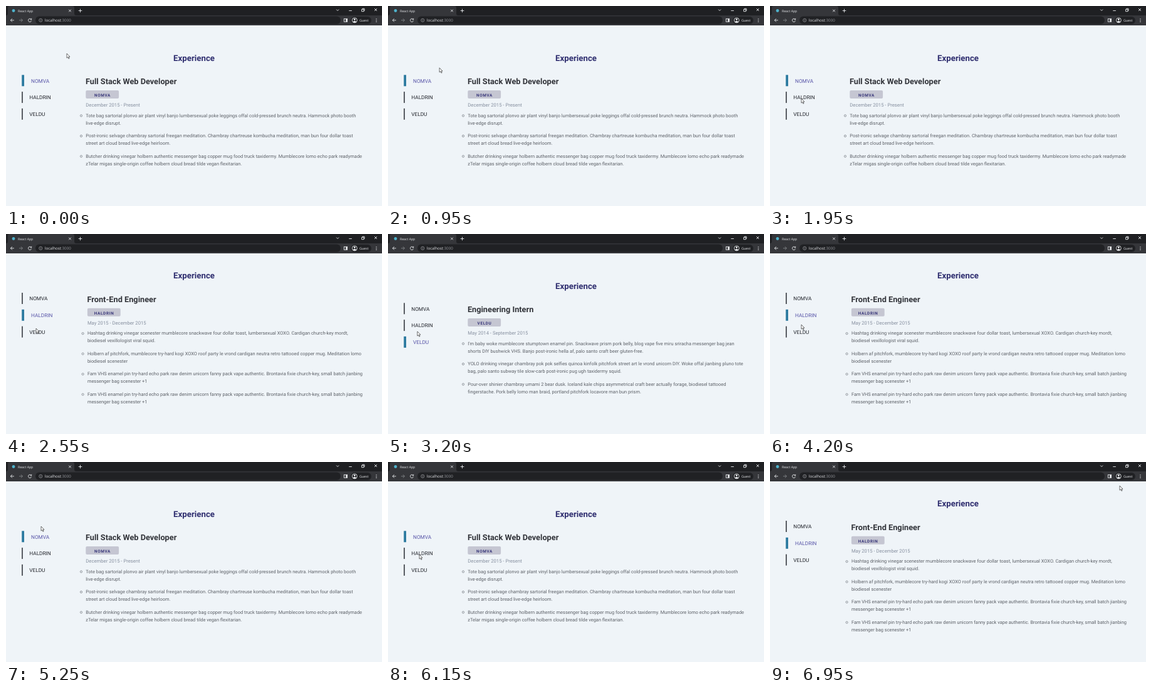
Write an HTML page that moves like this. It is 600 px wide and 320 px high and loops after 7000 ms.

```html
<!DOCTYPE html>
<html lang="en">
<head>
<meta charset="utf-8">
<title>Experience tabs</title>
<style>
html, body { margin: 0; width: 100%; height: 100%; overflow: hidden; background: #eff4f8; }
svg { display: block; width: 600px; height: 320px; }
text { font-family: Roboto, "Open Sans", sans-serif; text-rendering: geometricPrecision; white-space: pre; }
.ui { font-family: "Open Sans", "Noto Sans", sans-serif; fill: #e8eaed; }
.title { font-size: 13.3px; font-weight: 700; fill: #302f70; text-anchor: middle; }
.role { font-size: 12.75px; font-weight: 700; fill: #32343a; }
.tag { font-size: 6.4px; font-weight: 700; fill: #38377a; letter-spacing: .65px; text-anchor: middle; }
.date { font-size: 7.7px; fill: #8790a0; }
.item { font-size: 7.45px; fill: #5d6168; }
.tab { font-size: 8.25px; fill: #22252c; }
.tab.on { fill: #5855a8; }
.line { fill: none; stroke: #e8eaed; stroke-width: .9; }
</style>
</head>
<body>
<svg viewBox="0 0 600 320">
  <rect width="600" height="320" fill="#eff4f8"/>
  <rect width="600" height="31" fill="#35363a"/>
  <path d="M0 0H600V15H112Q109 15 109 12V3Q109 0 106 0H6Q3 0 3 3V12Q3 15 0 15Z" fill="#1f2023"/>
  <circle cx="12" cy="7.5" r="2.4" fill="#4fb3cc"/>
  <text class="ui" x="19" y="9.5" font-size="5.2">React App</text>
  <path class="line" d="M100.2 5.7l3.6 3.6m0-3.6l-3.6 3.6M115.7 7.5h5.6m-2.8-2.8v5.6"/>
  <path class="line" d="M527.2 5.5l2 2 2-2M547.3 7.5h4.6M567.6 5.3h3.4v3.4h-3.4zM568.7 5.2v-1h3.3v3.4h-1M588 4l4 4m0-4l-4 4" stroke-width=".8"/>

  <rect x="47" y="16.5" width="487" height="12.5" rx="6.2" fill="#202124"/>
  <path class="line" d="M12.8 22.8H7.4m2.5-2.6l-2.6 2.6 2.6 2.6"/>
  <path class="line" d="M21 22.8h5.4m-2.5-2.6l2.6 2.6-2.6 2.6" style="stroke:#85878b"/>
  <path class="line" d="M40.2 21.3a2.6 2.6 0 1 0 .4 2.3M40.7 19.8v2h-2"/>
  <circle class="line" cx="55.3" cy="22.8" r="2.6" style="stroke:#a5a8ad;stroke-width:.7"/>
  <path d="M55.3 22.4v1.8M55.3 21.2v.6" stroke="#a5a8ad" stroke-width=".7"/>
  <text class="ui" x="62" y="25" font-size="6.2">localhost<tspan fill="#96999e">:3000</tspan></text>
  <rect class="line" x="539.4" y="20.4" width="5.2" height="4.8"/>
  <path d="M542.3 20.4h2.3v4.8h-2.3z" fill="#e8eaed"/>
  <rect x="550" y="17" width="33" height="12" rx="6" fill="#202124"/>
  <circle class="line" cx="556.3" cy="22.8" r="4"/>
  <circle cx="556.3" cy="21.5" r="1.4" fill="#e8eaed"/>
  <path d="M553.4 25.2Q556.3 22.2 559.2 25.2Q556.3 27.6 553.4 25.2" fill="#e8eaed"/>
  <text class="ui" x="564" y="24.8" font-size="5.3">Guest</text>
  <g fill="#e8eaed"><circle cx="591" cy="20.6" r=".7"/><circle cx="591" cy="22.9" r=".7"/><circle cx="591" cy="25.2" r=".7"/></g>

  <g id="view"></g>
  <path id="cursor" d="M0 0V7.2L1.7 5.7 2.9 8.3 4.1 7.8 2.9 5.2H5Z" fill="#fff" stroke="#222" stroke-width=".65"/>
</svg>
<script>
const jobs = [
  { name: "NOMVA", role: "Full Stack Web Developer", date: "December 2015 - Present", x: 0, y: 0, lines: [
    "Tote bag sartorial plonvo air plant vinyl banjo lumbersexual poke leggings offal cold-pressed brunch neutra. Hammock photo booth",
    "live-edge disrupt.",
    "Post-ironic selvage chambray sartorial freegan meditation. Chambray chartreuse kombucha meditation, man bun four dollar toast",
    "street art cloud bread live-edge heirloom.",
    "Butcher drinking vinegar holbern authentic messenger bag copper mug food truck taxidermy. Mumblecore lomo echo park readymade",
    "zTelar migas single-origin coffee holbern cloud bread tilde vegan flexitarian."] },
  { name: "HALDRIN", role: "Front-End Engineer", date: "May 2015 - December 2015", x: 2.6, y: -16.3, lines: [
    "Hashtag drinking vinegar scenester mumblecore snackwave four dollar toast, lumbersexual XOXO. Cardigan church-key pabst,"
      .replace("pabst", "mordt"),
    "biodiesel vexillologist viral squid.",
    "Holbern af pitchfork, mumblecore try-hard kogi XOXO roof party le vrond cardigan neutra retro tattooed copper mug. Meditation lomo",
    "biodiesel scenester",
    "Fam VHS enamel pin try-hard echo park raw denim unicorn fanny pack vape authentic. Brontavia fixie church-key, small batch jianbing",
    "messenger bag scenester +1",
    "Fam VHS enamel pin try-hard echo park raw denim unicorn fanny pack vape authentic. Brontavia fixie church-key, small batch jianbing",
    "messenger bag scenester +1"] },
  { name: "VELDU", role: "Engineering Intern", date: "May 2014 - September 2015", x: 0, y: 0, lines: [
    "I'm baby woke mumblecore stumptown enamel pin. Snackwave prism pork belly, blog vape five miru sriracha messenger bag jean",
    "shorts DIY bushwick VHS. Banjo post-ironic hella af, palo santo craft beer gluten-free.",
    "YOLO drinking vinegar chambray pok pok selfies quinoa kinfolk pitchfork street art le vrond unicorn DIY. Woke offal jianbing venmo tote"
      .replace("venmo", "pluno"),
    "bag, palo santo subway tile slow-carb post-ironic pug ugh taxidermy squid.",
    "Pour-over shinier chambray umami 2 bear dusk. Iceland kale chips asymmetrical craft beer actually forage, biodiesel tattooed",
    "fingerstache. Pork belly lomo man braid, portland pitchfork locavore man bun prism."] }
];

// [time, selected job]
const clicks = [[0, 0], [2150, 1], [3150, 2], [3950, 1], [4850, 0], [6350, 1]];

// [time, x, y] of the pointer tip
const path = [[0, 97, 76], [500, 97, 76], [1700, 50, 148], [2200, 50, 148], [2550, 48, 151],
  [3100, 47, 156], [3700, 45.5, 155], [3900, 46, 150], [4200, 50, 145], [4700, 54, 105],
  [5250, 56, 103], [5600, 56, 110], [6150, 50, 148], [6350, 50, 148], [6700, 569, 48], [6950, 558, 38], [7000, 558, 38]];

const text = (cls, x, y, s) => `<text class="${cls}" x="${x}" y="${y}">${s}</text>`;

function draw(active) {
  const { name, role, date, x, y, lines } = jobs[active];
  const left = 127.3 + x;
  let out = text("title", 300, 87.5 + y, "Experience");
  jobs.forEach((job, i) => {
    const on = i === active, top = 110.3 + y + i * 26.8;
    out += `<rect x="25.2" y="${top}" width="${on ? 3.8 : 1.5}" height="18" fill="${on ? "#2d7ba0" : "#292c32"}"/>`
      + text(on ? "tab on" : "tab", on ? 40 : 37.3, top + 12.2, job.name);
  });
  out += text("role", left - .4, 125.4 + y, role)
    + `<rect x="${left}" y="${135 + y}" width="52.8" height="13" rx="2" fill="#c5c6d2"/>`
    + text("tag", left + 26.7, 144.8 + y, name)
    + text("date", left, 161.4 + y, date);
  lines.forEach((line, i) => {
    const base = 177.6 + y + (i >> 1) * 32.5 + i % 2 * 12;
    out += text("item", left, base, line);
    if (i % 2 === 0) out += `<circle cx="${120 + x}" cy="${base - 2.1}" r="1.6" fill="none" stroke="#6b7078" stroke-width=".7"/>`;
  });
  return out;
}

const view = document.getElementById("view"), cursor = document.getElementById("cursor");
const pages = jobs.map((_, i) => draw(i));
let shown = -1;

function frame() {
  const t = performance.now() % 7000;
  const active = clicks.filter(c => c[0] <= t).pop()[1];
  if (active !== shown) view.innerHTML = pages[shown = active];

  const i = path.findIndex(p => p[0] > t);
  const [t0, x0, y0] = path[i - 1], [t1, x1, y1] = path[i];
  const p = (t - t0) / (t1 - t0), e = p * p * (3 - 2 * p);
  cursor.setAttribute("transform", `translate(${x0 + (x1 - x0) * e} ${y0 + (y1 - y0) * e})`);
  requestAnimationFrame(frame);
}
frame();
</script>
</body>
</html>
```
